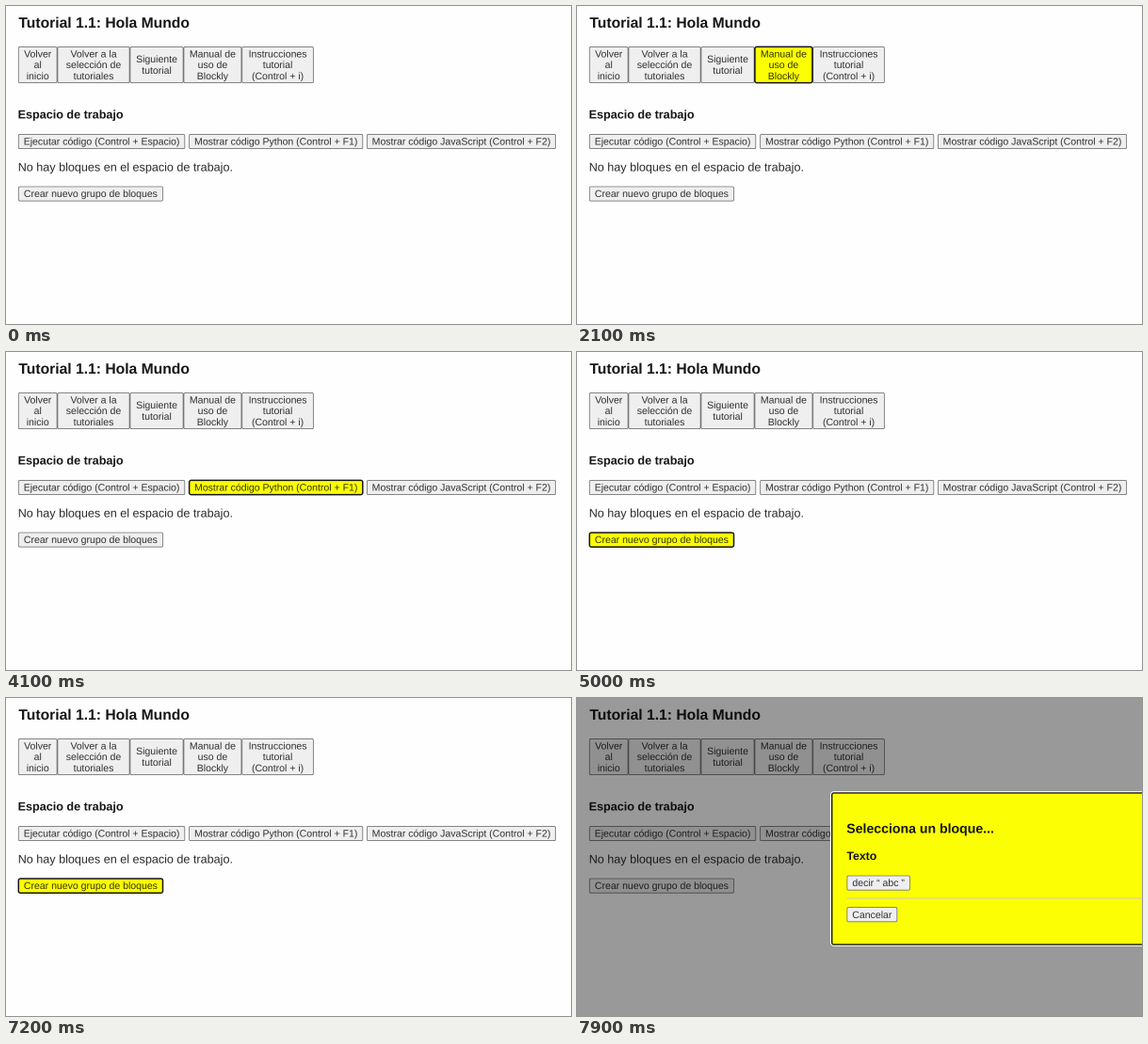
These frames come from a looping animation (600x338 px, 8 s). An HTML page with a canvas:

```html
<!DOCTYPE html>
<html lang="es">
<head>
<meta charset="utf-8">
<title>Tutorial</title>
<style>
  html, body { margin: 0; width: 100%; height: 100%; overflow: hidden; background: #fefefe; }
  canvas { display: block; width: 600px; height: 338px; }
</style>
</head>
<body>
<canvas id="stage" width="1200" height="676"></canvas>
<script>
// Drawn at double size and shown at half, for soft subpixel edges.
const ctx = document.getElementById('stage').getContext('2d');
ctx.scale(2, 2);
ctx.textRendering = 'geometricPrecision';

const LOOP = 8000;
const DIALOG_OPEN = 7300;
const DIALOG_FOCUS = 7500;
const YELLOW = '#fcff03';
const FACE = '"Liberation Sans", Arial, sans-serif';

// Buttons in tab order, each with the time at which it takes the focus.
const buttons = [
  { x: 12.9, y: 43, w: 41.6, h: 39, at: 600, lines: ['Volver', 'al', 'inicio'] },
  { x: 54.5, y: 43, w: 77, h: 39, at: 1100, lines: ['Volver a la', 'selección de', 'tutoriales'] },
  { x: 131.5, y: 43, w: 57, h: 39, at: 1500, lines: ['Siguiente', 'tutorial'] },
  { x: 188.5, y: 43, w: 61.8, h: 39, at: 2000, lines: ['Manual de', 'uso de', 'Blockly'] },
  { x: 250.3, y: 43, w: 76.5, h: 39, at: 2400, lines: ['Instrucciones', 'tutorial', '(Control + i)'] },
  { x: 12.9, y: 136, w: 177.3, h: 16, at: 3400, lines: ['Ejecutar código (Control + Espacio)'] },
  { x: 194.2, y: 136, w: 185, h: 16, at: 3900, lines: ['Mostrar código Python (Control + F1)'] },
  { x: 383, y: 136, w: 201, h: 16, at: 4300, lines: ['Mostrar código JavaScript (Control + F2)'] },
  { x: 12.9, y: 191.6, w: 154, h: 16, at: 4700, lines: ['Crear nuevo grupo de bloques'] }
];
const dialogButtons = [
  { x: 286.5, y: 188.6, w: 67.3, h: 16, lines: ['decir “ abc ”'] },
  { x: 286.5, y: 222.2, w: 53.7, h: 16, lines: ['Cancelar'] }
];

function text(str, x, y, font, color = '#161616', align = 'left') {
  ctx.font = `${font} ${FACE}`;
  ctx.fillStyle = color;
  ctx.textAlign = align;
  ctx.fillText(str, x, y);
}

function box(x, y, w, h, r, fill, stroke, line) {
  ctx.beginPath();
  ctx.roundRect(x, y, w, h, r);
  ctx.fillStyle = fill;
  ctx.fill();
  ctx.strokeStyle = stroke;
  ctx.lineWidth = line;
  ctx.stroke();
}

function button({ x, y, w, h, lines }, focused) {
  if (focused) box(x + .4, y + .4, w - .8, h - .8, 2, YELLOW, '#141414', 1.5);
  else box(x + .4, y + .4, w - .8, h - .8, 1.4, '#efefef', '#767676', .85);
  const step = 11.8;
  const first = y + h / 2 + 3.6 - step * (lines.length - 1) / 2;
  lines.forEach((line, i) =>
    text(line, x + w / 2, first + i * step, '10.53px', 'rgba(0,0,0,.8)', 'center'));
}

function dialog(focused) {
  ctx.fillStyle = 'rgba(0,0,0,.4)';
  ctx.fillRect(0, 0, 600, 338);
  if (focused) {
    box(270.2, 100.4, 340, 162.2, 2.5, YELLOW, '#fff', 2.6);
    box(270.7, 100.9, 340, 161.2, 2, YELLOW, '#141414', 1.4);
  } else {
    ctx.fillStyle = '#fefefe';
    ctx.fillRect(270.4, 100.6, 340, 162);
  }
  text('Selecciona un bloque...', 286.3, 143.5, 'bold 14.1px');
  text('Texto', 286.4, 172.2, 'bold 12.3px');
  ctx.fillStyle = focused ? '#d2d2a0' : '#a8a8a8';
  ctx.fillRect(286.5, 212.3, 320, 1.2);
  dialogButtons.forEach(b => button(b, false));
}

function draw(t) {
  ctx.fillStyle = '#fefefe';
  ctx.fillRect(0, 0, 600, 338);
  text('Tutorial 1.1: Hola Mundo', 13.4, 23, 'bold 15.67px');
  text('Espacio de trabajo', 12.6, 119.6, 'bold 12.6px');
  text('No hay bloques en el espacio de trabajo.', 12.7, 175.5, '12.6px', '#2a2a2a');

  const focus = t < DIALOG_FOCUS ? buttons.filter(b => t >= b.at).pop() : null;
  buttons.forEach(b => { if (b !== focus) button(b, false); });
  if (focus) button(focus, true);
  if (t >= DIALOG_OPEN) dialog(t >= DIALOG_FOCUS);
}

const start = performance.now();
function frame() {
  draw((performance.now() - start) % LOOP);
  requestAnimationFrame(frame);
}
frame();
</script>
</body>
</html>
```
